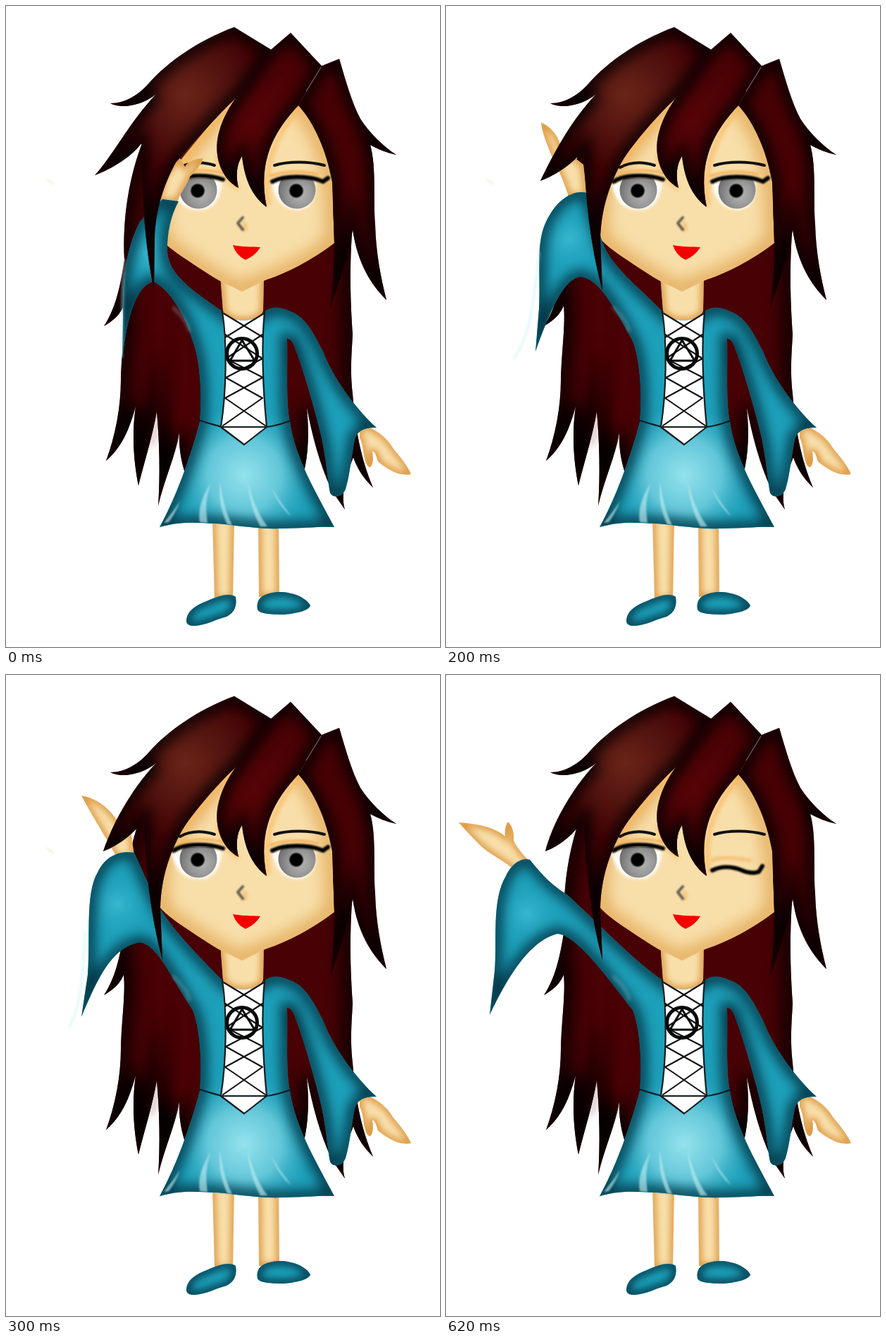
Recreate the animation shown at these times as an HTML page with a canvas. Size 616 by 909 pixels, loop 700 ms.

```html
<!DOCTYPE html>
<html lang="en">
<head>
<meta charset="utf-8">
<title>Waving girl</title>
<style>
html, body { margin: 0; width: 100%; height: 100%; overflow: hidden; background: #fff; }
canvas { display: block; }
</style>
</head>
<body>
<canvas id="stage" width="616" height="909"></canvas>
<script>
const W = 616, H = 909, STEP = 100, LOOP = 700;
const stage = document.getElementById('stage').getContext('2d');
let g;

// Fill a path, then darken its rim with a blurred stroke kept inside it.
function shape(d, fill, edge, width, blur) {
  const p = new Path2D(d);
  g.fillStyle = fill;
  g.fill(p);
  if (!edge) return;
  g.save();
  g.clip(p);
  g.filter = `blur(${blur}px)`;
  g.strokeStyle = edge;
  g.lineWidth = width;
  g.stroke(p);
  g.restore();
}

function line(d, color, width, blur = 0) {
  g.save();
  if (blur) g.filter = `blur(${blur}px)`;
  g.strokeStyle = color;
  g.lineWidth = width;
  g.lineCap = g.lineJoin = 'round';
  g.stroke(new Path2D(d));
  g.restore();
}

function soft(d, fill, blur) {
  g.save();
  g.filter = `blur(${blur}px)`;
  g.fillStyle = fill;
  g.fill(new Path2D(d));
  g.restore();
}

function disc(x, y, r, fill) {
  g.fillStyle = fill;
  g.beginPath();
  g.arc(x, y, r, 0, 7);
  g.fill();
}

function radial(x, y, r, ...colors) {
  const grad = g.createRadialGradient(x, y, 0, x, y, r);
  colors.forEach((c, i) => grad.addColorStop(i / (colors.length - 1), c));
  return grad;
}

const skin = d => shape(d, '#f8dfaa', '#d98f35', 8, 5);
const hair = (d, fill = '#480205', width = 18, blur = 10) => shape(d, fill, '#060001', width, blur);

// Raised arm: from the neck, round the cuff, to the armpit.
const HAND = 'M18 209C45 211 70 216 84 229C83 220 85 212 88 208C95 215 97 225 96 235C102 248 112 257 122 268L100 280C90 266 60 255 45 238C35 228 26 218 18 209Z';
const poses = [
  {
    sleeve: 'C275 410 232 385 229 350C228 320 235 295 245 277L222 274L190 306C170 345 165 390 166 440L165 500C172 440 185 398 208 391C225 395 252 430 265 475',
    hand: 'M215 278L243 278C249 262 258 252 261 242C268 235 277 226 280 216C270 216 258 220 254 228L246 215L225 240Z',
    tip: [126, 240], root: 192, edge: 211, end: [210, 402], glow: [200, 350],
    streak: 'M168 360C164 400 166 440 164 498'
  },
  {
    sleeve: 'C270 395 235 375 222 335L196 280C175 283 155 310 150 345C143 390 147 420 145 450L148 510C155 460 175 393 205 387C225 390 250 430 265 475',
    tip: [130, 240], root: 194, edge: 223, end: [223, 404], glow: [188, 340]
  },
  {
    sleeve: 'C270 395 235 370 222 335L200 265C180 260 160 275 148 295C125 330 135 370 132 430L127 490C145 440 165 388 190 384C215 385 235 420 265 475',
    hand: 'M135 165C150 172 160 185 163 200L195 225L200 270L174 270C165 240 150 215 145 200C140 188 136 175 135 165Z',
    tip: [134, 248], root: 196, edge: 219, end: [222, 404], glow: [175, 330],
    streak: 'M132 350C126 410 120 470 96 500'
  },
  {
    sleeve: 'C270 395 235 360 215 325L182 252C160 248 140 258 130 280C112 310 120 375 116 425L107 485C130 430 150 386 190 379C215 382 235 430 265 475',
    hand: 'M107 171C130 175 148 190 160 210C163 203 166 198 168 196L175 205L183 264L158 260C148 240 125 205 107 171Z',
    tip: [138, 250], root: 196, edge: 219, end: [222, 404], glow: [158, 325],
    streak: 'M112 365C109 410 109 465 90 498'
  },
  {
    sleeve: 'C265 395 220 345 185 305C165 285 150 262 138 247C120 250 105 275 97 300C86 340 92 400 83 468C100 430 135 372 178 368C200 372 225 420 265 475',
    hand: HAND, shift: [21, -12],
    tip: [141, 250], root: 196, edge: 219, end: [222, 404], glow: [135, 325],
    streak: 'M79 345C70 390 75 435 66 475'
  },
  {
    sleeve: 'C255 395 215 350 170 310C145 295 130 275 119 262C105 258 92 270 85 285C64 320 73 380 69 420L62 482C80 445 113 378 158 367C185 368 230 430 265 475',
    hand: HAND, shift: [0, 0], wink: true,
    tip: [141, 250], root: 196, edge: 219, end: [222, 404], glow: [115, 338]
  }
];

function backHair() {
  hair('M195 190C175 240 165 300 168 360C162 400 155 430 139 454C155 445 163 435 167 425'
    + 'C170 450 164 490 163 530C163 570 155 610 142 645C165 625 175 600 184 568'
    + 'C178 610 182 650 188 680C198 640 208 610 214 575C218 620 219 665 216 709'
    + 'C225 670 240 640 246 605C245 630 250 650 255 665L410 640L422 664'
    + 'C430 635 430 600 427 570C435 610 445 650 463 688L481 714C474 690 485 660 493 640'
    + 'C500 660 510 672 521 683C503 640 496 600 492 550C488 515 491 490 492 465'
    + 'C489 420 487 370 492 310L300 150Z', '#480205', 24, 13);
  line('M222 395C210 460 235 540 205 620M250 460C260 530 250 580 240 620', 'rgba(95,5,8,.25)', 10, 6);
}

function legs() {
  skin('M293 725L324 725L322 842L296 842Z');
  skin('M358 725L387 725L388 838L359 838Z');
  const shoe = d => shape(d, '#1a9fb8', '#06384a', 11, 6);
  shoe('M256 873C256 855 275 848 287 843C303 836 318 832 326 838C328 850 325 860 313 866C297 870 285 878 268 879C260 879 257 877 256 873Z');
  shoe('M357 856C354 840 365 833 385 831C405 830 425 838 432 850C430 857 415 861 395 863C375 863 360 862 357 856Z');
}

function eye(x, sclera, lash, crease) {
  soft(sclera, '#fff', 2);
  g.save();
  g.beginPath();
  g.rect(x - 40, 244, 80, 50);
  g.clip();
  disc(x, 261, 26.5, radial(x + 5, 267, 34, '#b4b4b4', '#989898', '#6c6c6c'));
  disc(x - 1, 262, 11, radial(x - 1, 262, 11, '#000', '#000', '#000', '#000', 'rgba(0,0,0,0)'));
  g.restore();
  line(crease, '#f5b45c', 4, 1.5);
  line(lash, '#000', 6, .8);
}

function face(wink) {
  skin('M304 380L366 380L365 432C360 451 314 451 308 432Z');
  shape('M222 250C218 290 218 310 219 330C230 342 245 352 257 360C275 372 290 382 304 390L335 405C350 398 360 392 370 388'
    + 'C400 378 435 360 466 336L463 250C455 205 437 165 410 130L325 125Z', '#f8dfaa', '#dd9a40', 17, 12);
  line('M324 135C296 164 268 195 248 229', '#fbb85f', 5, 3);
  line('M416 145C385 180 365 220 372 280', '#fbb85f', 5, 3);
  line('M301 215C303 230 313 248 329 258', '#f9bd6b', 5, 3);

  eye(273, 'M235 253C252 244 285 244 306 250C304 280 290 290 272 289C252 288 241 278 235 253Z',
    'M238 249C253 238 288 239 308 246', 'M242 241C260 231 288 232 308 237');
  line('M247 229C262 221 280 221 296 226', '#111', 4, .5);
  if (wink) {
    line('M377 263C390 257 412 260 432 263', '#f5b764', 4, 2);
    line('M378 277C392 270 408 272 420 277C430 281 439 281 444 279L449 271', '#000', 6, .8);
  } else {
    eye(413, 'M378 252C395 244 425 244 439 250C440 278 430 289 412 289C393 287 382 275 378 252Z',
      'M378 249C395 240 430 240 450 249L457 244', 'M376 241C398 233 425 234 442 239');
  }
  line('M381 226C400 220 430 220 452 226', '#111', 4, .5);
  line('M337 318C341 316 341 312 338 308', '#f3b96a', 4, 2);
  line('M336 300L329 308L336 317', '#655e50', 4, .8);
  shape('M322 339C335 342 348 341 361 342C355 352 348 356 340 360C330 355 325 348 322 339Z', '#f50000');
}

function bodice() {
  shape('M307 433C320 450 355 450 367 433C364 460 364 520 365 545C367 565 369 580 370 597L338 622L305 597C310 565 313 530 311 490Z', '#fff');
  line('M307 433C314 480 313 545 305 597L338 622L370 597C365 545 362 485 367 433'
    + 'M276 588C287 592 298 594 306 597L370 597C382 596 393 592 404 588', '#101c20', 2.2);
  line('M309 436L365 470M366 436L311 470M311 466L364 500M364 466L312 500'
    + 'M312 500L365 527M364 500L312 527M312 527L364 556M364 527L311 556'
    + 'M311 556L368 595M364 556L308 595', '#111', 2.1);
  g.strokeStyle = '#050708';
  g.lineWidth = 5;
  g.beginPath();
  g.arc(335, 493, 21.5, 0, 7);
  g.stroke();
  line('M335 474L318 503L353 503Z', '#050708', 3);
}

function dress(sleeve, glow) {
  skin('M502 593C520 597 540 610 550 628C560 640 570 652 575 664C560 667 545 660 528 646C525 635 522 630 520 632C522 645 520 655 515 654C506 645 509 625 502 612Z');
  const outline = 'M307 433' + sleeve
    + 'C275 500 279 550 275 590C262 640 240 700 218 739C250 730 270 733 300 734'
    + 'C330 737 360 742 390 741C420 741 445 738 466 739C440 690 410 640 403 590'
    + 'C397 560 400 520 399 472C405 471 409 480 412 490C420 510 435 560 445 600'
    + 'C455 640 456 670 460 690C463 698 477 698 482 685C488 665 490 640 495 615'
    + 'C498 602 510 597 526 598C500 575 465 530 450 490C437 465 425 440 403 433'
    + 'C390 427 378 425 367 433C355 450 320 450 307 433Z';
  shape(outline, '#1da0ba');
  g.save();
  g.clip(new Path2D(outline));
  disc(338, 665, 105, radial(338, 665, 105, '#94e2ed', '#62c6d8', 'rgba(29,160,186,0)'));
  disc(...glow, 55, radial(...glow, 55, '#38b6cf', 'rgba(29,160,186,0)'));
  g.restore();
  shape(outline, 'rgba(0,0,0,0)', '#033444', 17, 9);
  const fold = d => soft(d, 'rgba(190,236,242,.65)', 1);
  fold('M291 676C278 695 272 715 275 732L286 733C283 710 284 695 291 676Z');
  fold('M304 674C301 697 306 718 314 735L321 736C311 716 307 697 304 674Z');
  fold('M343 675C345 700 352 722 361 738L371 738C357 719 350 700 343 675Z');
  fold('M376 680C382 698 392 713 405 724C395 710 384 697 376 680Z');
  fold('M247 702C239 714 231 724 224 733L231 732C238 723 243 713 247 702Z');
  line('M238 428C250 440 257 448 260 460', 'rgba(150,205,212,.3)', 5, 2);
  bodice();
}

function bangs({ tip: [x, y], root, edge, end }) {
  hair(`M324 30L378 63L330 127C300 155 265 195 ${edge + 30} 222C${edge + 12} 255 ${edge + 1} 290 ${edge} 330L${end}`
    + `C${edge - 14} 340 ${root + 1} 270 ${root} ${y - 45}C${root - 14} ${y - 26} ${x + 24} ${y - 9} ${x} ${y}C150 215 175 165 213 125`
    + 'C195 140 165 147 148 138C170 138 190 125 205 107C230 80 270 50 324 30Z',
    radial(255, 125, 110, '#6a2419', '#541510', '#440205'));
  hair('M473 75C482 105 490 135 503 160C516 180 535 199 554 211C540 208 528 203 517 197C526 230 521 270 524 310'
    + 'C525 350 532 385 540 417C518 395 499 365 492 317C484 365 470 400 460 428C464 395 466 370 466 337L463 250'
    + 'C455 205 437 165 415 141L448 85Z');
  hair('M404 38L448 85L415 141C380 178 357 220 370 285C352 272 339 250 335 213C327 225 326 242 330 258'
    + 'C304 244 294 210 302 180C308 157 318 142 328 128L376 62Z', radial(350, 165, 120, '#560407', '#480205'));
  line('M447 87L426 121', 'rgba(190,175,175,.65)', 1);
}

function scene(pose) {
  g.fillStyle = '#fff';
  g.fillRect(0, 0, W, H);
  if (!pose.wink) line('M58 246L67 252', 'rgba(250,222,165,.5)', 2.5, 1);
  backHair();
  legs();
  face(pose.wink);
  if (pose.hand) {
    g.save();
    if (pose.shift) g.translate(...pose.shift);
    skin(pose.hand);
    g.restore();
  }
  dress(pose.sleeve, pose.glow);
  if (pose.streak) line(pose.streak, 'rgba(195,238,248,.4)', 4, 1.5);
  bangs(pose);
}

const views = poses.map(pose => {
  const c = document.createElement('canvas');
  c.width = W;
  c.height = H;
  g = c.getContext('2d');
  scene(pose);
  return c;
});

const start = performance.now();
function tick() {
  const t = (performance.now() - start) % LOOP;
  stage.drawImage(views[Math.min(poses.length - 1, Math.floor(t / STEP))], 0, 0);
  requestAnimationFrame(tick);
}
tick();
</script>
</body>
</html>
```
